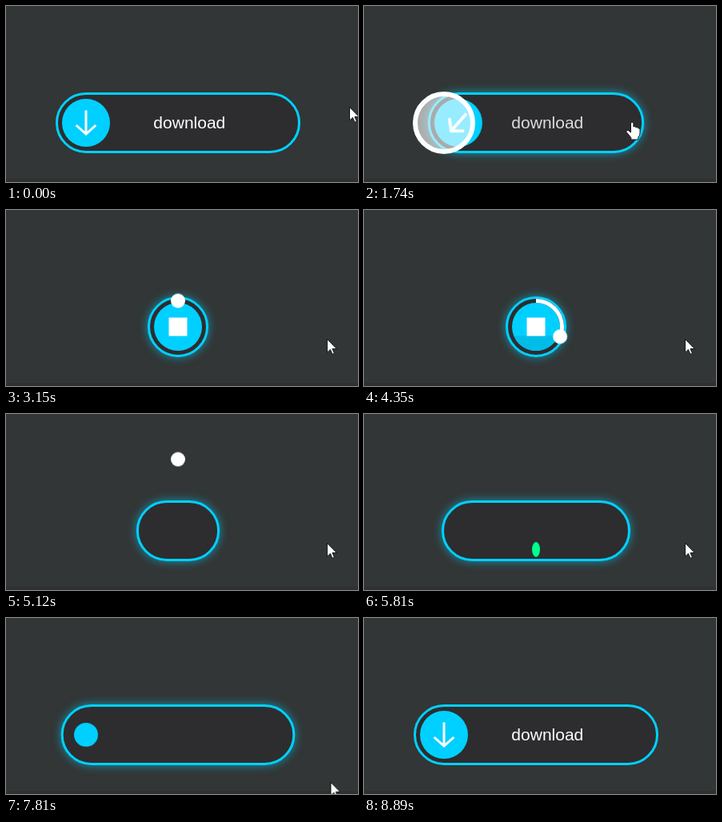
Animation of 440x220 px, one loop 8.99 s. Source, as an HTML page:

```html
<!DOCTYPE html>
<html lang="en">
<head>
<meta charset="utf-8">
<title>Download button</title>
<style>
@property --p { syntax: "<number>"; inherits: true; initial-value: 0; }

:root { --blue: #00d0ff; --green: #00ff8c; --glow: rgba(0, 208, 255, .6); }
html, body { margin: 0; width: 100%; height: 100%; overflow: hidden; background: #323636; }
svg { display: block; width: 440px; height: 220px; animation: progress 8990ms linear infinite; }
svg * { animation: 0s linear infinite; animation-duration: 8990ms; }
text { font: 21px "Liberation Sans", Arial, sans-serif; fill: #fff; text-anchor: middle; }

/* 1% = 89.9 ms */
@keyframes progress {
  0%, 35.04% { --p: 0; animation-timing-function: cubic-bezier(.42, 0, 1, 1); }
  48.39% { --p: .311; animation-timing-function: cubic-bezier(.4, .14, .7, .7); }
  54.5%, 57% { --p: 1; }
  57.01%, 100% { --p: 0; }
}

/* button body */
.bounce { animation-name: bounce; }
@keyframes bounce {
  0%, 64.85% { transform: none; animation-timing-function: ease-out; }
  65.8% { transform: translateY(8px); animation-timing-function: ease-in-out; }
  67.6% { transform: translateY(-3px); animation-timing-function: ease-in-out; }
  69.3% { transform: translateY(1.5px); animation-timing-function: ease-in-out; }
  71.5%, 100% { transform: none; }
}
.pill {
  y: -36.5px; height: 73px; rx: 36.5px;
  fill: #2d2d2f; stroke-width: 3px;
  animation-name: size, tint, glow;
}
@keyframes size {
  0%, 17.96% { x: -151.5px; width: 303px; animation-timing-function: ease; }
  28.39%, 56.17% { x: -36.5px; width: 73px; animation-timing-function: ease; }
  61.62%, 82.65% { x: -116.5px; width: 233px; animation-timing-function: ease; }
  91%, 100% { x: -151.5px; width: 303px; }
}
@keyframes tint {
  0%, 64.85% { stroke: var(--blue); }
  67.5%, 82.65% { stroke: var(--green); }
  87%, 100% { stroke: var(--blue); }
}
@keyframes glow {
  0%, 11.12% { filter: drop-shadow(0 0 0 transparent); }
  14.35%, 97.9% { filter: drop-shadow(0 0 6px var(--glow)); }
  98.85%, 100% { filter: drop-shadow(0 0 0 transparent); }
}

/* labels */
.label { animation-name: label; }
@keyframes label {
  0%, 18.8% { opacity: 1; }
  22.3%, 87% { opacity: 0; }
  92.66%, 100% { opacity: 1; }
}
.done { animation-name: done; }
@keyframes done {
  0%, 69.5% { opacity: 0; }
  74%, 82.65% { opacity: 1; }
  85.5%, 100% { opacity: 0; }
}

/* blue disc with its icon */
.slide { animation-name: slide; }
@keyframes slide {
  0%, 17.96% { transform: none; animation-timing-function: ease; }
  28.39%, 57.5% { transform: translateX(115px); }
  58.5%, 100% { transform: none; }
}
.disc { animation-name: disc; }
@keyframes disc {
  0%, 54.5% { transform: none; animation-timing-function: ease-in; }
  56.5%, 84.5% { transform: scale(0); animation-timing-function: ease-out; }
  91.5%, 100% { transform: none; }
}
.water { transform: translateY(calc(30px - 60px * var(--p))); }
.spin { animation-name: spin; }
@keyframes spin {
  0%, 17.96% { transform: none; animation-timing-function: cubic-bezier(.33, .08, .22, 1); }
  27.75%, 57.5% { transform: rotate(360deg); }
  57.51%, 100% { transform: none; }
}
.icon { fill: none; stroke: #fff; animation-name: morph, iconfade; }
@keyframes morph {
  0%, 18.6% {
    d: path("M0 -15.5L0 14M-12.3 3L0 14L12.3 3"); stroke-width: 3px;
    animation-timing-function: cubic-bezier(.4, .1, .4, 1);
  }
  26.5%, 57.5% { d: path("M0 -11.5L0 11.5M-11.5 0L0 0L11.5 0"); stroke-width: 23px; }
  58.5%, 100% { d: path("M0 -15.5L0 14M-12.3 3L0 14L12.3 3"); stroke-width: 3px; }
}
@keyframes iconfade {
  0%, 19% { opacity: 1; }
  24.7% { opacity: .87; }
  28%, 57% { opacity: 1; }
  58%, 87% { opacity: 0; }
  92.66%, 100% { opacity: 1; }
}

/* click ripple */
.ripple { fill: #fff; stroke: #fff; animation-name: ripple; }
@keyframes ripple {
  0%, 17.95% { opacity: 0; r: 30px; stroke-width: 8px; fill-opacity: .75; }
  17.96% { opacity: 1; r: 30px; stroke-width: 8px; fill-opacity: .75; }
  19.36% { opacity: 1; r: 36px; stroke-width: 6px; fill-opacity: .6; animation-timing-function: ease-out; }
  24.69% { opacity: .6; r: 44.5px; stroke-width: 1px; fill-opacity: 0; }
  25.6%, 100% { opacity: 0; r: 45px; stroke-width: 0; fill-opacity: 0; }
}

/* progress arc and ball */
.arc {
  fill: none; stroke: #fff; stroke-width: 5px;
  stroke-dasharray: 100 101; stroke-dashoffset: calc(100 - 100 * var(--p));
  animation-name: arc;
}
@keyframes arc {
  0%, 35% { opacity: 0; }
  35.1%, 54.5% { opacity: 1; }
  56%, 100% { opacity: 0; }
}
.orbit { transform: rotate(calc(360deg * var(--p))); }
.fly { animation-name: fly; }
@keyframes fly {
  0%, 54.5% { transform: translateY(-32.5px); animation-timing-function: cubic-bezier(.33, .67, .67, 1); }
  59.6% { transform: translateY(-110px); animation-timing-function: cubic-bezier(.33, 0, .67, .33); }
  64.63% { transform: translateY(23px); }
  64.85%, 100% { transform: translateY(30px); }
}
.ball { animation-name: ball; }
@keyframes ball {
  0%, 28.25% { transform: scale(0); fill: #fff; animation-timing-function: ease-out; }
  29.9% { transform: scale(1.33); animation-timing-function: ease-in-out; }
  31.6%, 54.5% { transform: none; }
  58% { transform: none; fill: #fff; }
  61% { transform: scale(.9, 1); fill: var(--green); }
  64.63% { transform: scale(.54, 1.05); fill: var(--green); }
  65.1% { transform: scale(1.3, .3); fill: var(--green); }
  65.7%, 100% { transform: scale(0); fill: var(--green); }
}

/* pointer */
.pointer { animation-name: pointer; }
@keyframes pointer {
  0%, 9.34% { transform: translate(430px, 127px); animation-timing-function: ease-in-out; }
  14.35%, 20% { transform: translate(334px, 145px); animation-timing-function: ease-in-out; }
  24.5%, 66% { transform: translate(402px, 162px); }
  69.9%, 82.65% { transform: translate(403px, 163px); animation-timing-function: ease-in; }
  88%, 100% { transform: translate(408px, 226px); }
}
.pointer path { fill: #fff; stroke: #17191a; stroke-width: 1px; stroke-linejoin: round; }
.arrow { animation-name: arrow; }
@keyframes arrow {
  0%, 11.8% { opacity: 1; }
  11.81%, 20.4% { opacity: 0; }
  20.41%, 100% { opacity: 1; }
}
.hand { animation-name: hand; }
@keyframes hand {
  0%, 11.8% { opacity: 0; }
  11.81%, 20.4% { opacity: 1; }
  20.41%, 100% { opacity: 0; }
}
</style>
</head>
<body>
<svg viewBox="0 0 440 220">
  <defs><clipPath id="round"><circle r="30"/></clipPath></defs>
  <rect y="216" width="440" height="4" fill="#2f3031"/>

  <g transform="translate(215 146)">
    <g class="bounce">
      <rect class="pill"/>
      <text class="label" x="14.3" y="7">download</text>
      <text class="done" y="7">done!</text>
    </g>
  </g>

  <g transform="translate(100 146)">
    <g class="slide">
      <g class="disc">
        <circle r="30" fill="#00d0ff"/>
        <g clip-path="url(#round)">
          <rect class="water" x="-30" width="60" height="62" fill="#00bce8"/>
        </g>
        <g class="spin"><path class="icon" d="M0 -15.5L0 14M-12.3 3L0 14L12.3 3"/></g>
      </g>
    </g>
    <circle class="ripple"/>
  </g>

  <g transform="translate(215 146)">
    <g transform="rotate(-90)"><circle class="arc" r="32.5" pathLength="100"/></g>
    <g class="orbit">
      <g class="fly"><circle class="ball" r="9"/></g>
    </g>
  </g>

  <g class="pointer">
    <path class="arrow" d="M-.5 -.5V16L3.4 12.4 6 18.3 8.4 17.2 5.9 11.5H11.2Z"/>
    <path class="hand" d="M-.5 1.5Q1.2 -.8 2.9 1.5V6Q4.6 4.8 5.8 6.8Q7.6 5.8 8.6 7.8Q10.8 7.2 11 9.4V14Q11 17 8.8 19V22H-.2V19.6L-6 12.4Q-6.4 9.6 -3.8 10.4L-.5 13Z"/>
  </g>
</svg>
</body>
</html>
```
